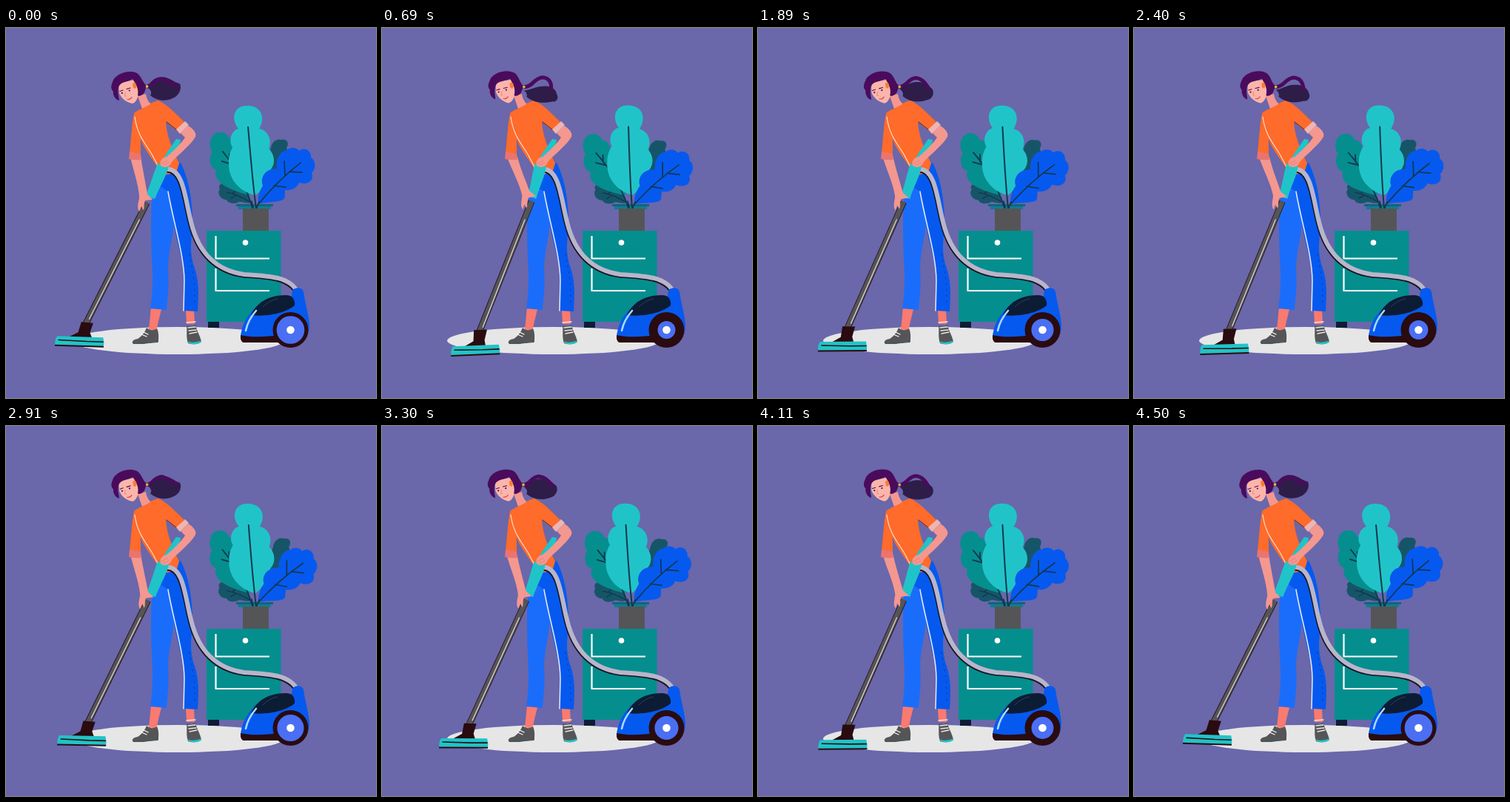
Write an HTML page with a canvas that moves like this. It is 500 px wide and 500 px high and loops after 4.53 s.

```html
<!DOCTYPE html>
<html lang="en">
<head>
<meta charset="utf-8">
<title>Vacuuming</title>
<style>
html, body { margin: 0; width: 100%; height: 100%; overflow: hidden; background: #6a67ab; }
canvas { display: block; width: 500px; height: 500px; }
</style>
</head>
<body>
<canvas id="stage" width="500" height="500"></canvas>
<script>
const ctx = document.getElementById('stage').getContext('2d');
const LOOP = 4530, STEP = 30;
const C = {
  bg: '#6a67ab', rug: '#e6e6e6', teal: '#058e8e', aqua: '#20c4c8', pine: '#165568',
  vein: '#10374f', blue: '#0659ef', lightBlue: '#1a6dfb', navy: '#0d1c35', dark: '#290b10',
  grey: '#555557', hose: '#b9b5ca', orange: '#ff6b2a', skin: '#f4978f', face: '#fcb5aa',
  ankle: '#fa7a70', cuff: '#ea7470', hair: '#4a0b5c', tail: '#2e1d48', white: '#ffffff'
};

const lerp = (a, b, k) => a + (b - a) * k;
const swing = (t, cycles) => 1 - Math.abs(1 - 2 * ((t * cycles / LOOP + 0.01) % 1));

function fill(d, color) {
  ctx.fillStyle = color;
  ctx.fill(new Path2D(d));
}
function stroke(d, color, width, cap = 'round') {
  ctx.strokeStyle = color;
  ctx.lineWidth = width;
  ctx.lineCap = cap;
  ctx.lineJoin = 'round';
  ctx.stroke(new Path2D(d));
}
function disc(x, y, r, color, ry = r) {
  ctx.fillStyle = color;
  ctx.beginPath();
  ctx.ellipse(x, y, r, ry, 0, 0, 7);
  ctx.fill();
}
function rect(x, y, w, h, color) {
  ctx.fillStyle = color;
  ctx.fillRect(x, y, w, h);
}
function turned(x, y, degrees, draw) {
  ctx.save();
  ctx.translate(x, y);
  ctx.rotate(degrees * Math.PI / 180);
  ctx.translate(-x, -y);
  draw();
  ctx.restore();
}
// Blends two path strings of the same structure.
function morph(a, b, k) {
  const target = b.match(/-?[\d.]+/g);
  let i = 0;
  return a.replace(/-?[\d.]+/g, n => lerp(+n, +target[i++], k).toFixed(2));
}

function drawCabinet() {
  disc(232, 422.5, 144, C.rug, 18.5);
  rect(273, 396, 15, 9, C.navy);
  rect(271, 274, 100.5, 123, C.teal);
  stroke('M283.5 281V311.5H356', C.white, 2.2, 'butt');
  stroke('M283.5 325V355H356', C.white, 2.2, 'butt');
  disc(323.5, 290, 3.8, C.white);
}

function drawPlant(main, right, back) {
  rect(311, 238, 50, 3, '#16637b');
  rect(314, 241, 44, 4, '#0d7d92');
  turned(342, 240, 4 * back, () =>
    fill('M343 222C352 200 354 176 358 161C360 152 368 149 372 151C380 149 383 156 379 162C383 170 380 178 374 180C368 196 356 213 343 222Z', C.pine));
  turned(333, 240, -2 * back, () => {
    fill('M331 236C324 238 317 234 315 235C307 239 299 236 298 232C289 232 285 222 289 218C285 211 294 208 301 211C309 208 320 213 322 220C327 224 330 230 331 236Z', C.pine);
    stroke('M299 222C312 225 322 230 331 236M306 224L311 219M311 226L304 230', C.vein, 1.3);
  });
  turned(333, 243, -3 * main, () => {
    fill('M330 226C310 222 290 212 287 206C282 200 283 194 285 192C274 190 274 172 279 168C272 158 277 140 290 141C297 141 301 146 302 150C312 150 314 166 312 172C322 180 324 200 330 226Z', C.teal);
    stroke('M293 167C305 182 321 203 333 243M292 180L305 184M302 180V170', C.vein, 1.8);
  });
  turned(338, 243, 3.4 * main, () => {
    fill('M337 226C318 222 300 206 301 182C300 172 305 164 306 161C300 152 305 138 314 136C304 124 306 105 326 105C347 105 350 124 342 136C354 138 360 152 355 163C364 172 364 185 357 192C352 208 346 220 337 226Z', C.aqua);
    stroke('M327 134C330 168 333 208 338 243', C.vein, 2);
  });
  turned(341, 240, 4 * right, () => {
    fill('M341 238C339 226 345 217 347 213C343 202 350 190 366 190C364 176 372 165 380 165C384 160 394 162 396 166C402 160 413 165 412 175C419 180 419 190 413 196C417 206 408 213 396 209C393 216 386 220 377 219C376 226 379 231 372 233C362 236 352 235 341 238Z', C.blue);
    stroke('M341 238C355 221 376 199 398 182M377 199L376 180M383 194L400 195M362 213L378 215', C.vein, 1.7);
  });
  stroke('M332 234L334 243M342 235L339 243', C.vein, 1.6);
  rect(320, 244, 35, 30, C.grey);
}

function drawLegs() {
  fill('M196 378L210 380L203 409L193 407Z', C.ankle);
  fill('M243 381H254L255 400H244Z', C.ankle);
  fill('M190 405C195 409 200 409 204 406C207 412 206 419 206 424L186 427L172 427C169 424 172 421 178 420C184 416 188 410 190 405Z', C.grey);
  stroke('M173 426.5L205 424.5', '#35595f', 1.2);
  stroke('M183 414L190 417M186 411L192 414', C.white, 1.2);
  fill('M244 402C248 404 253 403 256 401C258 410 263 417 264 424C260 428 251 428 246 426C243 418 245 410 244 402Z', C.grey);
  fill('M245 423C250 426 259 425 264 422C265 428 248 430 245 423Z', C.aqua);
  stroke('M244 398L256 397M246 405L256 404M247 409L257 408M248 413L258 411', C.rug, 1.3);

  fill('M208 190L236 182C246 202 251 226 252 258C253 282 246 294 254 322C262 342 260 365 259 383L240 382C240 360 243 340 239 318C230 285 224 252 218 222L204 210Z', C.blue);
  fill('M206 198L199 215C195 238 196 280 197 310C199 340 198 360 195 379L217 381C218 365 221 350 219 325C220 295 229 275 226 250L219 221L208 214Z', C.lightBlue);
  stroke('M219 221C226 262 241 308 241 342L240 382', '#e4ecff', 1.5);
  ctx.setLineDash([1, 7]);
  stroke('M248 306C252 328 256 345 255 372', '#0b3f9f', 1.3);
  ctx.setLineDash([]);
}

function drawHose() {
  const d = 'M216 191C240 188 242 232 250 262C260 304 285 328 322 333C355 335 384 336 394 357';
  ctx.save();
  ctx.translate(-0.8, 1.2);
  stroke(d, '#17131f', 6.8, 'butt');
  ctx.restore();
  stroke(d, C.hose, 6, 'butt');
}

function drawCleaner(p) {
  fill('M317 420C317 402 327 386 341 374C355 364 372 362 386 362L387 355C390 350 400 350 402 356C404 372 409 386 410 401C410 414 405 423 396 425H322Z', C.blue);
  fill('M317 415C335 419 352 417 372 415V425H321C317 424 317 419 317 415Z', C.dark);
  fill('M331 388C338 372 354 361 378 361C387 361 391 367 390 375C381 383 357 391 331 388Z', C.navy);
  stroke('M324 409C326 399 331 390 338 382', '#a9d9ff', 2.6);
  stroke('M347 377C353 371 360 367 367 366', '#24425f', 1);
  disc(384.5, 408, 24, C.dark);
  disc(384.5, 408, lerp(19, 11.5, p), '#4a6ff3');
  disc(384.5, 408, 5.3, C.white);
}

function drawTorso() {
  fill('M178 92L189 89C190 97 194 102 199 105L184 109Z', C.skin);
  fill('M205 98C214 101 222 108 241 127L231 139L216 127C217 144 224 163 234 183L230 196L211 199C202 181 187 166 182 150L182 171L167 169C169 150 170 130 173 115C180 109 191 107 197 101Z', C.orange);
  stroke('M174 120C178 149 191 158 200 176L211 197', '#ffe2d8', 1.1);
  stroke('M217 127L231 138', '#3a2440', 1);
}

function drawHead(p) {
  turned(180, 100, 4 * p, () => {
    fill(morph(
      'M191 80C195 72 201 65 212 66C222 67 228 74 235 75C238 83 233 92 225 95C215 100 203 98 195 91C198 87 195 83 191 80Z',
      'M191 84C201 83 209 77 218 77C226 75 235 80 235 86C240 92 234 98 231 96C215 101 203 98 195 92C196 89 194 86 191 84Z', p), C.tail);
    stroke(morph(
      'M191 79C198 78 199 70 208 69C216 69 222 76 232 78',
      'M191 79C203 78 203 66 215 64C224 64 228 70 227 80', p), C.hair, 5);
    fill('M152 74L174 70L179 82C180 92 176 101 171 102C164 101 156 96 153 88Z', C.face);
    fill('M145 70C151 61 166 56 177 61C183 65 184 73 190 78L187 87C184 91 180 93 178 91C180 82 175 75 171 69C163 74 155 72 152 80C150 87 153 94 153 98C147 97 144 89 145 86C140 81 143 76 145 70Z', C.hair);
    fill('M171 75C175 72 178 77 175 82L172 81Z', '#ff7a2d');
    stroke('M154 85.5L158 84M163 82.5L168 81', C.hair, 1.1);
    disc(156.8, 88, 1.1, C.hair);
    disc(166.8, 84.5, 1.1, C.hair);
    stroke('M161 87L160.5 92L162.5 92', '#e0857f', 0.9);
    stroke('M164 96.5Q168 97 170 93.5', '#d94a54', 1.2);
    disc(190.5, 79, 1.9, '#e0b52c');
  });
}

function drawWand(p) {
  const pole = morph('M190 236L107 400', 'M203 234L133 412', p);
  stroke(pole, C.dark, 8.6, 'butt');
  stroke(pole, C.grey, 7, 'butt');
  stroke(morph('M180 259L112 393', 'M194 259L138 405', p), '#d9d5d5', 1.3);

  ctx.save();
  ctx.translate(lerp(98.5, 128, p), lerp(424, 437, p));
  ctx.rotate(lerp(1.8, -2.6, p) * Math.PI / 180);
  fill(morph('M2 -27L18 -26L14 -13L17 -6H-15L-2 -13Z', 'M-1 -28L17 -28L13 -14L14 -6H-15L-2 -13Z', p), C.dark);
  fill('M-30 -7H32Q34 -1 33 6H-33Q-33 -4 -30 -7Z', C.aqua);
  stroke('M-28 -2L10 -1L32 -1', C.dark, 1.6);
  stroke('M-33 5.5H33', C.dark, 2, 'butt');
  ctx.restore();

  fill('M230 150L236 151C235 160 229 173 221 183L211 178Z', C.aqua);
  fill(morph(
    'M205 183L220 186C218 198 207 215 201 231L188 227C195 213 199 196 205 183Z',
    'M207 183L222 187C221 200 213 214 209 231L197 227C202 213 203 196 207 183Z', p), C.aqua);
}

function drawArms(p) {
  fill('M236 142L246 132C253 136 258 142 256 147C249 159 235 169 224 181C222 188 214 190 209 186C207 180 211 175 217 174C229 164 238 154 242 148Z', C.skin);
  fill('M230 137L242 126L247 131L235 143Z', '#edb6b5');
  stroke('M210 183L218 179M212 186L220 182', '#e37a77', 0.8);

  fill(morph(
    'M168 174L182 174C185 192 188 208 191 225L198 232L188 233C185 238 188 244 185 246L183 241L180 248C176 243 179 235 180 229C179 211 172 193 168 174Z',
    'M169 174L183 174C188 192 195 207 200 220L209 227L199 229C196 234 198 240 196 243L193 238L191 245C187 240 190 231 190 226C186 209 176 193 169 174Z', p), C.skin);
  fill('M167 167L182 170L183 178Q174 179 166 177Z', C.cuff);
}

function draw(t) {
  const p = swing(t, 3);
  rect(0, 0, 500, 500, C.bg);
  drawCabinet();
  drawPlant(p, swing(t, 4), swing(t, 2));
  drawLegs();
  drawTorso();
  drawHead(p);
  drawHose();
  drawCleaner(p);
  drawWand(p);
  drawArms(p);
}

const start = performance.now();
function tick() {
  const t = (performance.now() - start) % LOOP;
  draw(Math.floor(t / STEP) * STEP);
  requestAnimationFrame(tick);
}
tick();
</script>
</body>
</html>
```
